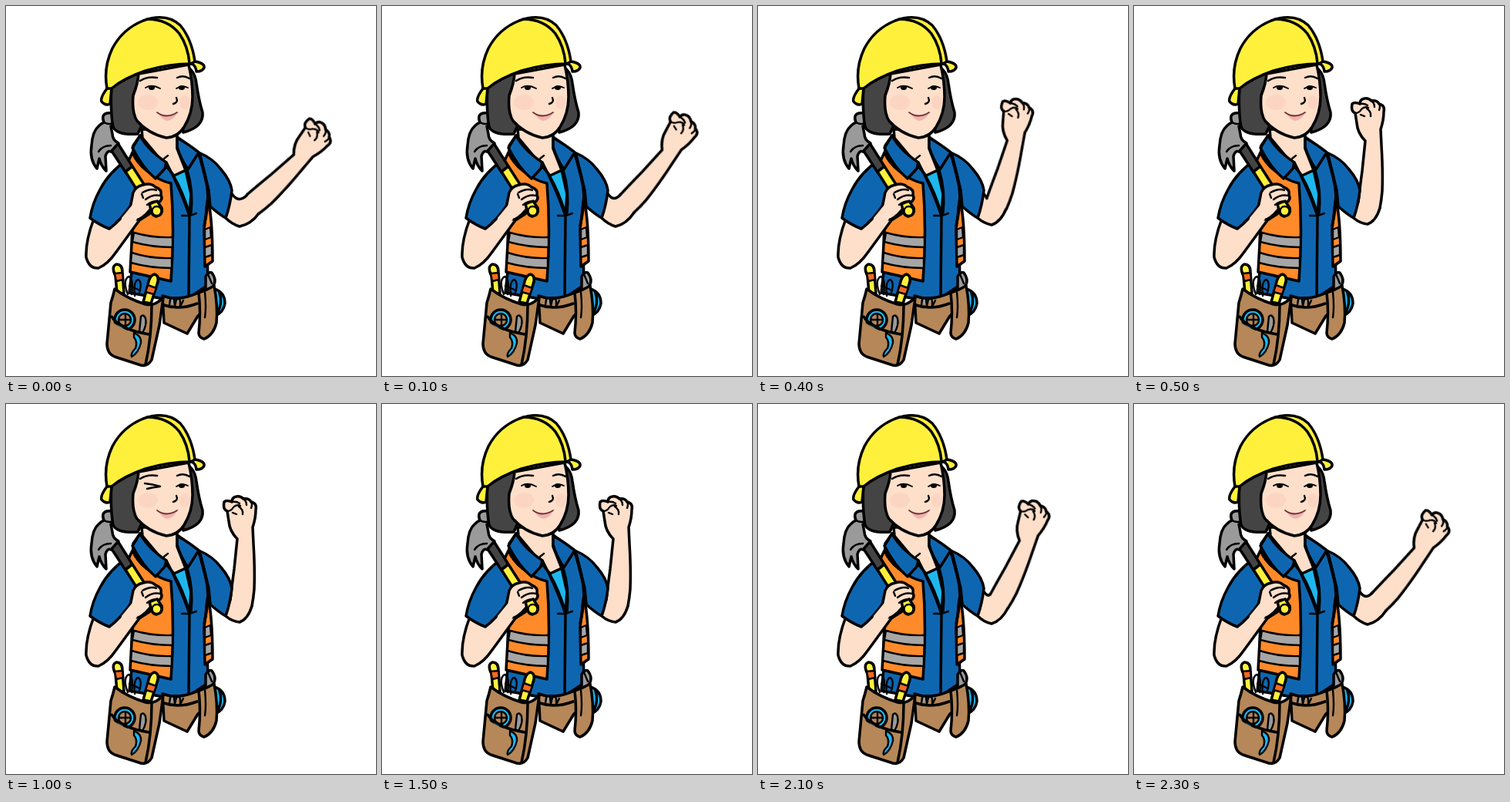
Recreate the animation shown at these times as an HTML page. Size 480 px wide and 480 px high, loop 2.4 s.

```html
<!DOCTYPE html>
<html lang="en">
<head>
<meta charset="utf-8">
<title>Builder</title>
<style>
html, body { margin: 0; width: 100%; height: 100%; overflow: hidden; background: #fff; }
svg { display: block; width: 100vw; height: 100vh; }
path, circle, ellipse { stroke: #000; stroke-width: 3.5; stroke-linecap: round; stroke-linejoin: round; fill: none; }
.skin { fill: #fddfca; }
.blue { fill: #0f66b0; }
.cyan { fill: #1fb6ee; }
.orange { fill: #ff8a2a; }
.yellow { fill: #fff03c; }
.grey { fill: #a6a6a6; }
.steel { fill: #9a9a9a; }
.brown { fill: #b58759; }
.dark { fill: #444; }
.band { fill: #f26a21; }
.ink { fill: #000; }
.lips { fill: #efb3ac; }
.fine { stroke-width: 2.4; }
.thin { stroke-width: 1.8; }
.bare { stroke: none; }
.blush { fill: #f9b9ad; stroke: none; opacity: .25; }

.loop { animation: 2400ms step-end infinite; }
#forearm { transform-origin: 314px 277px; animation-name: swing; }
#elbow { animation-name: bend; }
#open { animation-name: open; }
#wink { animation-name: wink; }

@keyframes swing {
  0%, 100% { transform: rotate(43deg); }
  4.16%, 95.83% { transform: rotate(36.5deg); }
  8.33%, 91.66% { transform: rotate(29.5deg); }
  12.49%, 87.49% { transform: rotate(22deg); }
  16.66%, 83.33% { transform: rotate(13deg); }
  20.83% { transform: rotate(0deg); }
}
/* keeps the elbow skin joined to both ends of the turning forearm */
@keyframes bend {
  0%, 100% { d: path("M313 245Q300 258 291 240L285 275Q293 283 303 286Q318 283 328 269"); }
  4.16%, 95.83% { d: path("M309 245Q299 256 291 240L285 275Q293 283 303 286Q317 283 327 268"); }
  8.33%, 91.66% { d: path("M305 246Q298 254 291 240L285 275Q293 283 303 286Q316 282 326 266"); }
  12.49%, 87.49% { d: path("M301 247Q297 251 291 240L285 275Q293 283 303 285Q316 281 324 265"); }
  16.66%, 83.33% { d: path("M297 249Q294 246 291 240L285 275Q293 282 303 284Q315 280 322 263"); }
  20.83% { d: path("M291 254Q291 246 291 240L285 275Q293 282 303 283Q314 279 319 262"); }
}
@keyframes open {
  0%, 62.49%, 100% { opacity: 1; }
  41.66% { opacity: 0; }
}
@keyframes wink {
  0%, 62.49%, 100% { opacity: 0; }
  41.66% { opacity: 1; }
}
</style>
</head>
<body>
<svg viewBox="0 0 480 480">
  <!-- raised arm -->
  <path id="elbow" class="skin loop" d="M291 254Q291 246 291 240L285 275Q293 282 303 283Q314 279 319 262"/>
  <g id="forearm" class="loop">
    <path class="skin" d="M291 254Q293 236 296 214L300 175Q290 165 289 152L287 139Q281 137 283 127Q286 124 293 127Q293 121 299 120Q304 119 308 123Q315 122 318 127Q326 129 324 137Q324 148 320 160L321 181Q323 214 322 240Q321 252 319 262"/>
    <path class="skin bare" d="M294 250L317 254L312 268L298 262Z"/>
    <path class="fine" d="M287 139Q292 139 295 134Q299 130 304 132M293 127Q299 126 303 129M302 133Q308 137 307 143M308 123Q312 126 312 131M294 141L299 143M318 127Q320 130 318 135"/>
  </g>

  <!-- belt behind -->
  <path class="cyan" d="M270 367Q284 371 284 386Q282 398 271 402Z"/>
  <path d="M277 372Q281 385 275 397"/>

  <!-- shirt -->
  <path class="blue" d="M174 168L165 181L163 345L160 372L205 380L238 378L262 362L260 262L263 241L250 190L222 171Z"/>
  <path class="brown" d="M203 376Q229 386 264 364L262 391L249 402L235 425L205 411Z"/>
  <path d="M205 388Q224 395 248 386"/>
  <path class="steel fine" d="M212 388L213 381Q216 377 218 381L219 389L221 381Q225 378 226 383L226 390L230 382"/>
  <path class="blue" d="M222 170L250 190Q269 198 279 212Q291 226 293 239Q291 258 285 275Q276 270 265 260L263 239L252 194Z"/>
  <path class="orange" d="M262 250Q268 277 268 331L258 338L257 290Q259 272 262 250Z"/>
  <path class="grey fine" d="M258 290L265 287L266 300L258 303ZM258 313L267 310L267 323L258 326Z"/>
  <path d="M250 192Q261 222 262 248Q262 264 257 285"/>

  <!-- vest -->
  <path class="orange" d="M164 190L158 203L170 234L169 269L164 291L161 345L214 357Q219 290 214 230Q199 227 183 214Q170 204 164 190Z"/>
  <path class="grey fine" d="M166 294Q190 301 216 300L216 313Q189 313 164 306ZM163 320Q188 328 215 327L215 340Q187 340 162 333Z"/>

  <!-- neck and collar -->
  <path class="cyan" d="M217 220L233 213L240 244L238 270Q229 240 217 220Z"/>
  <path class="skin" d="M176 160L177 171L218 220L233 213L222 185L222 160Z"/>
  <path class="blue" d="M174 168Q183 186 208 203L206 211L194 224Q178 211 164 184Z"/>
  <path class="blue" d="M222 171Q238 180 250 190L236 212Q226 197 222 183Z"/>
  <path d="M208 203Q225 235 238 272L237 374M235 213Q243 239 240 268"/>
  <path class="fine" d="M228 272L238 272L247 269M205 198L210 194"/>

  <!-- arm with hammer -->
  <path class="skin" d="M114 276Q103 305 104 326Q108 341 120 340Q132 335 143 319L173 278L187 269L168 247L132 287Z"/>
  <path class="blue" d="M158 199Q134 215 122 238Q112 256 109 275Q121 284 134 289Q149 278 163 257L171 235L164 214Z"/>
  <path class="dark" d="M135 185L145 178L164 208L156 217Z"/>
  <path class="yellow" d="M155 215L164 208L182 236L172 242Z"/>
  <path class="steel" d="M127 151Q123 141 131 139Q142 137 144 148Q143 155 136 156L138 166Q138 174 146 178L136 189Q131 187 129 195L130 214Q123 207 121 198L118 211Q108 199 111 181Q112 163 120 156Q124 152 127 151Z"/>
  <path class="fine" d="M127 151Q134 155 142 151M120 189Q125 181 136 181"/>
  <path class="skin" d="M161 262L165 242Q168 234 178 232Q188 229 194 235Q203 238 201 245Q204 251 198 255Q197 261 190 260Q182 272 172 277L163 276Z"/>
  <path class="skin bare" d="M150 275L164 258L174 270L164 285L148 300Z"/>
  <path class="fine" d="M177 242Q188 236 195 239M181 251Q190 244 200 246M183 258Q190 252 198 254M176 244L178 249"/>
  <path class="yellow" d="M186 257L196 253L202 262Q204 271 195 273Q189 272 188 264Z"/>
  <ellipse class="yellow fine" cx="195.500" cy="266" rx="6" ry="6"/>

  <!-- left pouch -->
  <path class="yellow" d="M144 373L142 350Q136 338 143 335Q151 335 151 345L153 373Z"/>
  <path class="band fine" d="M141 347L151 346L152 355L143 357Z"/>
  <path class="fine" d="M158 374Q151 356 159 351Q166 353 163 374M167 376Q165 356 172 355Q177 359 173 372M160 363L174 369"/>
  <path class="yellow" d="M178 384L184 362Q186 349 193 348Q200 351 196 361L188 386Z"/>
  <path class="band fine" d="M184 362L195 366L192 374L181 371Z"/>
  <path class="brown" d="M141 367Q139 376 136 385L131 438Q131 451 141 455L175 466Q184 468 189 459L199 414L204 378Q193 390 181 387Q158 380 141 367Z"/>
  <path d="M189 388Q189 430 181 465"/>
  <circle class="cyan" cx="154" cy="407" r="13"/>
  <circle class="brown fine" cx="154" cy="407" r="8"/>
  <path class="fine" d="M146 407L162 407M155 400L155 415"/>
  <path class="steel fine" d="M173 422L175 403Q178 399 181 405Q183 414 177 424Z"/>
  <path class="brown bare" d="M138 410Q156 424 184 427L183 439L136 430Z"/>
  <path d="M137 403Q148 420 186 426"/>
  <path class="cyan fine" d="M166 424Q176 428 175 437Q172 450 163 455Q161 451 168 444Q171 435 166 430Z"/>

  <!-- right pouch -->
  <path class="steel" d="M259 368L259 351Q263 344 267 346Q273 354 270 361L266 368Z"/>
  <path class="fine" d="M262 348L267 360"/>
  <path class="brown" d="M250 372Q260 369 270 363Q275 389 273 411Q269 427 257 432Q250 430 250 424Q253 397 250 372Z"/>
  <path class="fine" d="M258 371Q260 392 258 404"/>

  <!-- head -->
  <path class="dark" d="M137 101Q135 136 139 157Q144 168 171 166L180 146L176 84Z"/>
  <path class="dark" d="M230 76Q245 82 247 100Q250 122 255 138Q257 157 230 164L226 120Z"/>
  <path class="skin" d="M172 88Q171 101 165 116Q163 138 170 149Q185 166 208 171Q223 170 231 157Q242 139 242 118Q242 98 237 76Z"/>
  <ellipse class="blush" cx="184" cy="125" rx="13" ry="10"/>
  <ellipse class="blush" cx="232" cy="125" rx="7" ry="9"/>
  <path class="fine" d="M174 97Q183 91 196 93M222 93Q230 89 238 94"/>
  <g id="open" class="loop">
    <path class="thin" d="M181 106Q189 101 200 107"/>
    <ellipse class="ink bare" cx="189" cy="106" rx="4" ry="3"/>
  </g>
  <path id="wink" class="fine loop" opacity="0" d="M180 103Q190 104 200 107Q191 108 183 110"/>
  <path class="thin" d="M221 107Q228 102 236 106"/>
  <ellipse class="ink bare" cx="228" cy="106" rx="4" ry="3"/>
  <path class="fine" d="M221 119Q224 125 217 127"/>
  <path class="lips bare" d="M197 139Q209 145 222 139Q217 148 209 149Q202 147 197 139Z"/>
  <path class="thin" d="M196 138Q208 147 222 138" style="stroke:#6d3038"/>

  <!-- helmet -->
  <path class="yellow" d="M131 107Q126 80 138 55Q151 30 178 19Q208 8 226 25Q241 43 245 72Q258 74 257 80Q255 85 247 85Q246 77 241 75Q211 75 181 84Q152 94 137 107L135 127Q129 130 124 124Q122 119 131 107Z"/>
  <path d="M131 107L137 107M245 72L240 75M183 17Q210 17 225 36Q236 52 238 74"/>
</svg>
</body>
</html>
```
